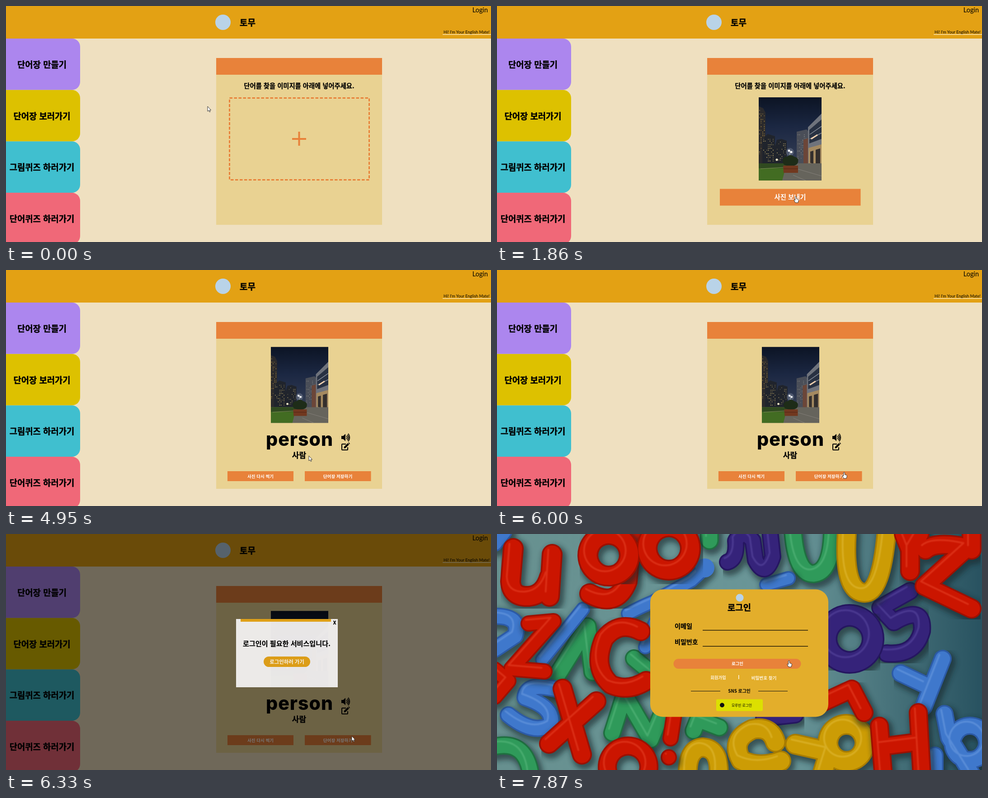
An HTML page for the animation above (8000 ms loop, 1073 px wide and 522 px high).

```html
<!DOCTYPE html>
<html lang="ko">
<head>
<meta charset="utf-8">
<title>Word cards</title>
<style>
html, body { margin: 0; width: 100%; height: 100%; overflow: hidden; background: #efe0c0; }
svg { display: block; width: 100vw; height: 100vh; }
text { font-family: "Noto Sans CJK KR", "Noto Sans CJK", sans-serif; font-weight: 700; }
.latin { font-family: Lato, sans-serif; font-weight: 400; }
.word { font-family: Inter, sans-serif; font-weight: 800; }
.letters path { fill: none; stroke-linecap: round; stroke-linejoin: round; }
</style>
</head>
<body>
<svg id="stage" viewBox="0 0 1073 522" preserveAspectRatio="none"></svg>
<script>
const LOOP = 8000;
const ORANGE = '#e8823a', CREAM = '#efe0c0';

const rect = (x, y, w, h, fill, extra = '') =>
  `<rect x="${x}" y="${y}" width="${w}" height="${h}" fill="${fill}" ${extra}/>`;
const line = (d, color, width, extra = '') =>
  `<path d="${d}" fill="none" stroke="${color}" stroke-width="${width}" ${extra}/>`;
const shape = (d, fill, extra = '') => `<path d="${d}" fill="${fill}" ${extra}/>`;

// Text centred vertically on y
function label(str, x, y, size, { fill = '#000', anchor = 'middle', weight = 700, heavy = 0 } = {}) {
  return `<text x="${x}" y="${y}" dy=".37em" font-size="${size}" text-anchor="${anchor}" fill="${fill}"
    stroke="${fill}" stroke-width="${heavy}" style="font-weight:${weight}">${str}</text>`;
}

function seeded(seed) {
  return () => (seed = (seed * 16807) % 2147483647) / 2147483647;
}

// Lit windows scattered over a facade
function windows(x, y, w, h, chance, color, random) {
  let out = '';
  for (let row = y; row < y + h; row += 4)
    for (let col = x; col < x + w; col += 3.5)
      if (random() < chance) out += rect(col, row, 1.8, 1.6, color, `opacity="${(0.4 + random() * 0.6).toFixed(2)}"`);
  return out;
}

function nightPhoto() {
  const random = seeded(41);
  return `<symbol id="photo" viewBox="0 0 139 184">
    ${rect(0, 0, 139, 184, 'url(#sky)')}
    ${shape('M0 20L10 24L15 34V150H0Z', '#2b2a2c')}
    ${windows(1, 28, 11, 100, 0.45, '#c9a24a', random)}
    ${shape('M8 92L20 81L36 86V108L40 94L50 92L62 96V150H8Z', '#20242c')}
    ${windows(10, 92, 24, 52, 0.4, '#c7b06c', random)}
    ${windows(40, 98, 20, 44, 0.35, '#b3a16c', random)}
    ${shape('M84 76L106 71L112 78V150H84Z', '#4a4e58')}
    ${windows(86, 82, 22, 54, 0.4, '#8d8c88', random)}
    ${shape('M99 94L110 90V148H99Z', '#6c4638')}
    ${shape('M109 66L139 36V160L109 146Z', '#6f737c')}
    ${shape('M112 72L139 49V92L112 102Z', '#283142')}
    ${line('M113 82L139 64M113 92L139 79', '#8b919c', 1.5)}
    ${line('M116 92L130 83', '#f4d2b0', 3)}
    ${shape('M110 112L139 104V154L110 146Z', '#a58a60')}
    ${shape('M114 120L121 118V147L114 145ZM126 116L136 113V152L126 149Z', '#342f2d')}
    ${shape('M0 146H139V184H0Z', '#66645c')}
    ${shape('M0 146H62L52 184H0Z', '#426c22')}
    ${shape('M0 146H60L58 157H0Z', '#304a20')}
    ${line('M4 158L56 155', '#7d8c58', 1.2)}
    ${line('M84 158L139 174M76 172L104 184', '#85817a', 1)}
    ${line('M69 118V150', '#a0a6ac', 1.2)}
    <circle cx="69" cy="121" r="9" fill="#dfe8f2" opacity=".2"/>
    <circle cx="67" cy="118" r="2.5" fill="#fff"/><circle cx="72" cy="121" r="2.5" fill="#fff"/>
    <circle cx="40" cy="138" r="2.5" fill="#fff0ca"/>
    ${shape('M54 146Q50 132 63 131Q70 124 78 131Q91 134 86 146Q82 152 70 152Q57 152 54 146Z', '#1e2c18')}
    ${shape('M54 151H87V167H55Z', '#71381f')}
    ${line('M55 158H87', '#4c2415', 1)}
  </symbol>`;
}

function page() {
  const menu = [
    ['단어장 만들기', '#ac86ee'], ['단어장 보러가기', '#ddc100'],
    ['그림퀴즈 하러가기', '#40bfcf'], ['단어퀴즈 하러가기', '#f06878']
  ].map(([name, color], i) => {
    const y = 72 + i * 113.7;
    return rect(-20, y, 184, 113.7, color, 'rx="18"') + label(name, 79.5, y + 58, 18.8, { heavy: 0.4 });
  }).join('');
  return rect(0, 0, 1073, 522, CREAM) + rect(0, 0, 1073, 72, '#e3a114')
    + '<circle cx="480" cy="36" r="17" fill="#b9d3e8"/>'
    + label('토무', 534.5, 36.5, 19, { heavy: 0.4 })
    + '<text class="latin" x="1066" y="14" font-size="14.5" text-anchor="end">Login</text>'
    + '<text class="latin" x="1070" y="61" font-size="9.1" text-anchor="end">Hi! I\'m Your English Mate!</text>'
    + rect(966, 62.4, 107, 1.2, '#fff6dc') + menu
    + rect(465, 115, 367, 369, '#e9d292') + rect(465, 115, 367, 37, ORANGE);
}

const prompt = () => label('단어를 찾을 이미지를 아래에 넣어주세요.', 648.5, 177, 14.3, { heavy: 0.25 });

const dropZone = () =>
  rect(494.5, 203.5, 309, 181, 'none', `stroke="${ORANGE}" stroke-width="3" stroke-dasharray="6.5 3.5"`)
  + line('M633 294H664M648.5 278V309', ORANGE, 4);

const preview = () =>
  '<use href="#photo" x="579" y="202" width="139" height="184"/>'
  + rect(493, 404.5, 311.5, 37, ORANGE)
  + label('사진 보내기', 648.5, 423, 14.3, { fill: '#fff' });

function result() {
  const speaker = shape('M742 367H746L751 362.5V378.5L746 374H742Z', '#000')
    + line('M753.5 367.5Q756 370.5 753.5 373.5M755.5 365Q760 370.5 755.5 376M757.5 362.5Q763 370.5 757.5 378.5', '#000', 1.8, 'stroke-linecap="round"');
  const pencil = line('M752 385H744Q743 385 743 386V397Q743 398 744 398H755Q756 398 756 397V392', '#000', 2)
    + shape('M748 391L756 383L759 386L751 394L747.5 394.5ZM757 382L758.5 381.5L761 384L760 385.5Z', '#000');
  return '<use href="#photo" x="586" y="170" width="127" height="168.5"/>'
    + '<text class="word" x="649.5" y="389" font-size="41" text-anchor="middle" letter-spacing="1">person</text>'
    + label('사람', 648.5, 410, 17, { heavy: 0.3 }) + speaker + pencil
    + rect(490, 445, 146, 22, ORANGE) + label('사진 다시 찍기', 563, 456, 9.5, { fill: '#fff' })
    + rect(661, 445, 146.5, 22, ORANGE) + label('단어장 저장하기', 734, 456, 9.6, { fill: '#fff' });
}

const modal = () =>
  rect(0, 0, 1073, 522, '#000', 'opacity=".535"')
  + rect(509, 188, 225, 151, '#f4f2f2', 'opacity=".95"') + rect(519, 188, 200, 6, '#dfa017')
  + label('X', 727, 196.5, 10.5, { heavy: 0.3 })
  + label('로그인이 필요한 서비스입니다.', 621, 242, 15.1, { heavy: 0.2 })
  + rect(570, 271, 103, 23, '#dc9d18', 'rx="11.5"')
  + label('로그인하러 가기', 621.5, 283, 11.4, { fill: '#f5f1ea' });

// Thick plastic strokes: soft shadow, dark rim, body and a glossy streak
function plastic([rim, body, gloss], width, d) {
  return line(d, '#12262c', width + 12, 'transform="translate(5 7)" opacity=".6" filter="url(#soft)"')
    + line(d, rim, width + 4) + line(d, body, width - 3)
    + line(d, gloss, 4, `transform="translate(${-width / 5} ${-width / 4})" opacity=".3" filter="url(#sheen)"`);
}

const ring = (x, y, r) => `M${x} ${y - r}a${r} ${r} 0 1 0 .1 0Z`;

function magnets() {
  const green = ['#1f7040', '#2f9a5a', '#7ed39c'], blue = ['#2c5aa6', '#3f78cc', '#94bcf2'];
  const purple = ['#251660', '#35237a', '#7c6cc4'], yellow = ['#a87c00', '#cc9c05', '#f3d565'];
  const red = ['#9c1000', '#cb1500', '#ff6a4a'];
  return `<g class="letters">${rect(0, 0, 1073, 522, 'url(#board)')}`
    + plastic(green, 38, 'M470 -10V14M655 -5Q662 88 700 88Q740 84 742 -5M121 332L200 205L212 305')
    + plastic(green, 36, 'M255 440L282 355L340 455L368 390M303 275L345 310M-5 470Q65 455 75 535M435 435L445 410L492 428')
    + plastic(blue, 28, 'M100 278L190 166M290 176Q320 160 345 150L430 103L460 75M328 250L350 195M596 112L645 98')
    + plastic(blue, 34, 'M-8 182Q55 180 40 225L-5 255M138 345Q65 325 62 362Q130 385 118 422Q80 445 25 400M-5 20L15 -5')
    + plastic(blue, 36, 'M893 308L950 335M986 276L944 382M990 398L1000 450L1050 530M968 490V530' + ring(1046, 462, 38))
    + '<circle cx="460" cy="75" r="21" fill="#3f78cc"/>'
    + plastic(purple, 34, 'M510 62Q532 55 528 15Q545 -12 566 15L572 58Q594 100 610 50L604 -5M590 408L660 400')
    + plastic(purple, 36, 'M914 126L848 163L878 195Q945 155 940 215Q925 270 862 264')
    + plastic(purple, 46, ring(780, 232, 52))
    + plastic(yellow, 40, 'M774 -5Q765 130 814 130Q850 130 862 -5M422 535Q420 475 455 472Q495 475 490 535')
    + plastic(yellow, 42, 'M616 460Q605 424 565 432Q515 455 540 500Q580 520 628 502M660 465L735 482L720 530' + ring(773, 462, 41))
    + plastic(red, 42, 'M36 32L30 105Q32 140 70 138Q104 135 116 95M122 45L116 138M298 5L288 105Q265 165 205 132')
    + plastic(red, 42, ring(247, 47, 46) + ring(380, 32, 48))
    + plastic(red, 40, 'M900 0L914 35L935 0M914 35V82M948 35Q970 15 1040 30L946 115L1050 165M1050 -5V35')
    + plastic(red, 40, 'M318 215Q270 190 237 232Q210 295 252 333Q290 350 330 325M145 342L188 488M220 370L115 464')
    + plastic(red, 32, 'M70 198L125 193L32 298L105 304M-5 300L25 325L-5 360M392 400L384 452M380 494v.1')
    + plastic(red, 38, 'M846 425L855 535M932 395L940 535M852 470L932 460M705 380L785 343L812 395' + ring(290, 515, 46))
    + '</g>';
}

function login() {
  const small = { fill: '#fff4e0' }, left = { anchor: 'start', heavy: 0.2 };
  return magnets() + rect(339, 122.5, 394, 282, '#e3ae2b', 'rx="28"')
    + '<circle cx="537" cy="141" r="8.5" fill="#b9d3e8"/>'
    + label('로그인', 536, 163, 18.8, { heavy: 0.4 })
    + label('이메일', 393, 204, 14.2, left) + label('비밀번호', 393, 239, 14, left)
    + line('M455 212.8H688M455 248.3H688', '#000', 1.2)
    + rect(390.5, 276, 282, 22, ORANGE, 'rx="11"') + label('로그인', 532, 287, 9.4, { fill: '#fff' })
    + label('회원가입', 489.5, 318, 9.4, small) + label('비밀번호 찾기', 590.5, 318, 9.6, small)
    + rect(534, 312, 1.6, 9, '#fff4e0')
    + line('M429 347.5H494M578 347.5H643', '#111', 1) + label('SNS 로그인', 536, 347.5, 9.8)
    + rect(485, 365.5, 103, 26, '#dce000', 'rx="3"')
    + '<circle cx="498" cy="378.5" r="5" fill="#111"/>'
    + label('모루빈 로그인', 541.5, 379, 7.8, { weight: 400 });
}

const pointers = {
  arrow: shape('M0 0V11L2.6 8.8L4.3 12.5L6 11.7L4.4 8.2H7.5Z', '#fff', 'stroke="#222" stroke-width=".9"'),
  hand: shape('M-1.3 1Q0 -.8 1.3 1V5.5L5 6.5Q6.5 7 6.3 9L5 14H-.8L-3.8 9Q-4.2 7.2 -2.5 7.6L-1.3 8.8Z', '#fff', 'stroke="#222" stroke-width=".9"'),
  beam: line('M-2.5 0H2.5M0 0V13M-2.5 13H2.5', '#333', 1)
};

const scenes = [
  ['page', page, 0, 7870], ['prompt', prompt, 0, 3530], ['drop', dropZone, 0, 1860],
  ['preview', preview, 1860, 3530], ['result', result, 3530, 7870],
  ['modal', modal, 6200, 7870], ['login', login, 7870, LOOP]
];

const path = [
  [0, 446, 222], [70, 446, 222], [720, 645, 290], [940, 645, 290], [1660, 661, 421],
  [4870, 661, 421], [4950, 670, 411], [5450, 752, 382], [5670, 752, 382], [5940, 768, 447],
  [6200, 768, 447], [6270, 765, 447], [6400, 765, 447], [7350, 646, 280], [LOOP, 646, 280]
];

const stage = document.getElementById('stage');
stage.innerHTML = `<defs><linearGradient id="sky" x2="0" y2="1">
  <stop stop-color="#0c1424"/><stop offset=".35" stop-color="#1b2742"/><stop offset=".75" stop-color="#323c53"/>
  </linearGradient>
  <linearGradient id="board"><stop stop-color="#67908f"/><stop offset=".6" stop-color="#6a9698"/>
  <stop offset="1" stop-color="#285260"/></linearGradient>
  <filter id="soft"><feGaussianBlur stdDeviation="6"/></filter>
  <filter id="sheen"><feGaussianBlur stdDeviation="1.2"/></filter>${nightPhoto()}</defs>`
  + scenes.map(([id, draw]) => `<g id="${id}">${draw()}</g>`).join('')
  + '<g id="cursor">' + Object.entries(pointers).map(([id, art]) => `<g id="${id}">${art}</g>`).join('') + '</g>';

const node = id => document.getElementById(id);
const show = (id, on) => node(id).setAttribute('display', on ? 'inline' : 'none');
const smooth = p => p * p * (3 - 2 * p);

function cursorAt(t) {
  const i = path.findIndex(key => key[0] > t);
  const [t0, x0, y0] = path[i - 1], [t1, x1, y1] = path[i];
  const p = smooth((t - t0) / (t1 - t0));
  return [x0 + (x1 - x0) * p, y0 + (y1 - y0) * p];
}

function pointerKind(t, x, y) {
  if (t >= 1860 && t < 3530) return 'hand';
  if (t >= 3530 && t < 4900) return 'beam';
  if (t < 6200) return t > 5000 && (y > 444 || x > 741 && y < 400) ? 'hand' : 'arrow';
  return x < 673 && y < 294 ? 'hand' : 'arrow';
}

function render(t) {
  for (const [id, , from, to] of scenes) show(id, t >= from && t < to);
  const [x, y] = cursorAt(t), kind = pointerKind(t, x, y);
  for (const id in pointers) show(id, id === kind);
  node('cursor').setAttribute('transform', `translate(${x.toFixed(2)} ${y.toFixed(2)})`);
}

const start = performance.now();
function tick() {
  render((performance.now() - start) % LOOP);
  requestAnimationFrame(tick);
}
tick();
</script>
</body>
</html>
```
